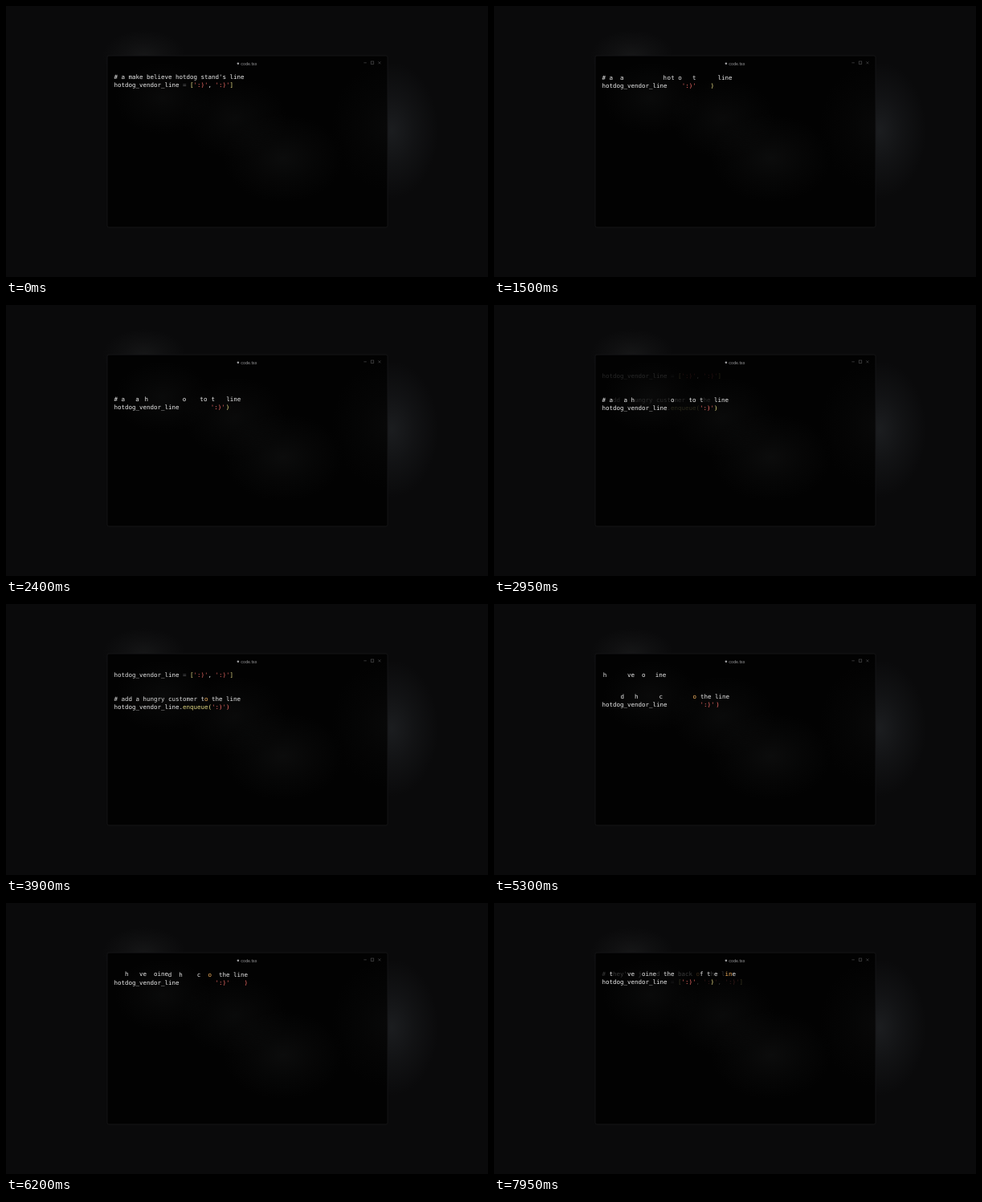
These frames come from a looping animation (600 by 338 pixels, 8 s). An HTML page with a canvas:

```html
<!DOCTYPE html>
<html lang="en">
<head>
<meta charset="utf-8">
<title>Hotdog queue</title>
<style>
html, body { margin: 0; width: 100%; height: 100%; overflow: hidden; background: #0a0a0b; }
canvas { display: block; width: 600px; height: 338px; }
</style>
</head>
<body>
<canvas id="stage"></canvas>
<script>
const W = 600, H = 338, LOOP = 8000, STEP = 50;
const LEFT = 134.5, BASE = 91.4, PITCH = 4.5, LEADING = 10;
const WHITE = '#ececec', RED = '#f86f6b', YELLOW = '#f0e68c', ORANGE = '#f2b05e', GREY = '#6c6c6f';
const START = 270, PERIOD = 3460;
const FADE_OUT = 900, MOVE_AT = 802, MOVE = 2000, FADE_IN_AT = 2570, FADE_IN = 700;

const canvas = document.getElementById('stage');
const ctx = canvas.getContext('2d');
const dpr = window.devicePixelRatio || 1;
canvas.width = W * dpr;
canvas.height = H * dpr;

const clamp = x => Math.min(1, Math.max(0, x));

function easeInOutExpo(u) {
  if (u <= 0) return 0;
  if (u >= 1) return 1;
  return u < 0.5 ? 2 ** (20 * u - 10) / 2 : 1 - 2 ** (10 - 20 * u) / 2;
}

function colourLine(text) {
  const colours = Array(text.length).fill(WHITE);
  const paint = (pattern, colour) => {
    for (const m of text.matchAll(pattern)) colours.fill(colour, m.index, m.index + m[0].length);
  };
  paint(/\b(of|in)\b/g, ORANGE);
  if (text[0] !== '#') {
    paint(/=/g, GREY);
    paint(/[\[\]()]|\w+(?=\()/g, YELLOW);
    paint(/'[^']*'/g, RED);
  }
  return colours;
}

// One entry per character, line breaks included.
function layOut(source) {
  return source.split('\n').flatMap((text, line) => {
    const colours = colourLine(text);
    return [...text + '\n'].map((ch, col) => ({ ch, line, col, colour: colours[col] }));
  });
}

const codes = [
`# a make believe hotdog stand's line
hotdog_vendor_line = [':)', ':)']`,
`hotdog_vendor_line = [':)', ':)']


# add a hungry customer to the line
hotdog_vendor_line.enqueue(':)')`,
`# they've joined the back of the line
hotdog_vendor_line = [':)', ':)', ':)']`,
`hotdog_vendor_line = [':)', ':)', ':)']


# serve the first customer in queue
hotdog_vendor_line.serve(':)')`
].map(layOut);

// Longest common subsequence that prefers unbroken runs.
function matchChars(a, b) {
  const HIT = 1000, RUN = 4, NEAR = 2;
  const grid = fill => Array.from({ length: a.length + 1 }, () => Array(b.length + 1).fill(fill));
  const best = grid(0), hit = grid(-Infinity), rowHit = grid(-Infinity);
  for (let i = 1; i <= a.length; i++) {
    for (let j = 1; j <= b.length; j++) {
      if (a[i - 1].ch === b[j - 1].ch) {
        hit[i][j] = HIT + Math.max(best[i - 1][j - 1], hit[i - 1][j - 1] + RUN, rowHit[i - 1][j - 1] + NEAR);
      }
      rowHit[i][j] = Math.max(rowHit[i][j - 1], hit[i][j]);
      best[i][j] = Math.max(best[i - 1][j], best[i][j - 1], hit[i][j]);
    }
  }

  const pairs = [];
  let i = a.length, j = b.length, forced = false;
  while (i > 0 && j > 0) {
    if (!forced && best[i - 1][j] === best[i][j]) { i--; continue; }
    if (!forced && hit[i][j] !== best[i][j]) { j--; continue; }
    const rest = hit[i][j] - HIT;
    i--;
    j--;
    pairs.push([a[i], b[j]]);
    const run = rest === hit[i][j] + RUN;
    const near = !run && rest === rowHit[i][j] + NEAR;
    if (near) while (hit[i][j] !== rowHit[i][j]) j--;
    forced = run || near;
  }
  return pairs;
}

const scenes = codes.slice(1).map((to, n) => {
  const from = codes[n];
  const pairs = matchChars(from, to);
  const kept = new Set(pairs.flat());
  const loose = code => code.filter(c => !kept.has(c));
  return { start: START + n * PERIOD, from, to, pairs, leaving: loose(from), entering: loose(to) };
});

function drawChar(ch, colour, col, line) {
  if (ch.trim() === '') return;
  ctx.fillStyle = colour;
  ctx.fillText(ch, LEFT + col * PITCH, BASE + line * LEADING);
}

function drawChars(chars, alpha) {
  ctx.globalAlpha = alpha;
  for (const c of chars) drawChar(c.ch, c.colour, c.col, c.line);
  ctx.globalAlpha = 1;
}

function drawScene(t) {
  const { start, from, to, pairs, leaving, entering } = scenes.findLast(s => t >= s.start) || scenes[0];
  const r = t - start;
  ctx.font = '7.5px "DejaVu Sans Mono", "Noto Sans Mono", monospace';
  ctx.textAlign = 'left';
  ctx.textBaseline = 'alphabetic';
  if (r < 0) return drawChars(from, 1);

  drawChars(leaving, 1 - clamp(r / FADE_OUT) ** 1.6);
  drawChars(entering, clamp((r - FADE_IN_AT) / FADE_IN));
  const p = easeInOutExpo((r - MOVE_AT) / MOVE);
  const mix = (a, b) => a + (b - a) * p;
  for (const [a, b] of pairs) drawChar(a.ch, b.colour, mix(a.col, b.col), mix(a.line, b.line));
}

function glow(x, y, rx, ry, rgb, alpha) {
  ctx.save();
  ctx.translate(x, y);
  ctx.scale(rx, ry);
  const g = ctx.createRadialGradient(0, 0, 0, 0, 0, 1);
  g.addColorStop(0, `rgba(${rgb},${alpha})`);
  g.addColorStop(0.5, `rgba(${rgb},${alpha * 0.45})`);
  g.addColorStop(1, `rgba(${rgb},0)`);
  ctx.fillStyle = g;
  ctx.fillRect(-1, -1, 2, 2);
  ctx.restore();
}

function drawWindow() {
  ctx.fillStyle = '#0a0a0b';
  ctx.fillRect(0, 0, W, H);
  glow(172, 62, 52, 32, '70,72,72', 0.2);
  glow(480, 155, 58, 85, '72,78,84', 0.28);

  ctx.beginPath();
  ctx.roundRect(126, 62, 349, 214, 2);
  ctx.fillStyle = '#020202';
  ctx.fill();
  ctx.save();
  ctx.clip();
  glow(195, 115, 60, 45, '60,62,62', 0.13);
  glow(285, 140, 65, 50, '60,62,62', 0.13);
  glow(345, 190, 75, 55, '60,62,62', 0.16);
  glow(475, 150, 70, 80, '60,62,62', 0.1);
  ctx.restore();
  ctx.beginPath();
  ctx.roundRect(126, 62, 349, 214, 2);
  ctx.strokeStyle = '#19191a';
  ctx.lineWidth = 0.8;
  ctx.stroke();

  ctx.fillStyle = '#a2a2a4';
  ctx.beginPath();
  ctx.arc(288.9, 71.8, 1.3, 0, Math.PI * 2);
  ctx.fill();
  ctx.font = '5px Inter, Roboto, sans-serif';
  ctx.textAlign = 'left';
  ctx.textBaseline = 'alphabetic';
  ctx.fillText('code.tsx', 292.2, 73.6);

  ctx.strokeStyle = '#565658';
  ctx.lineWidth = 0.6;
  ctx.strokeRect(454.2, 69, 3.6, 3.6);
  ctx.beginPath();
  ctx.moveTo(445.4, 70.8);
  ctx.lineTo(448.8, 70.8);
  ctx.moveTo(463.4, 69.3);
  ctx.lineTo(466.4, 72.3);
  ctx.moveTo(466.4, 69.3);
  ctx.lineTo(463.4, 72.3);
  ctx.stroke();
}

function frame() {
  const t = Math.floor((performance.now() % LOOP) / STEP) * STEP;
  ctx.setTransform(dpr, 0, 0, dpr, 0, 0);
  drawWindow();
  drawScene(t);
  requestAnimationFrame(frame);
}
frame();
</script>
</body>
</html>
```
